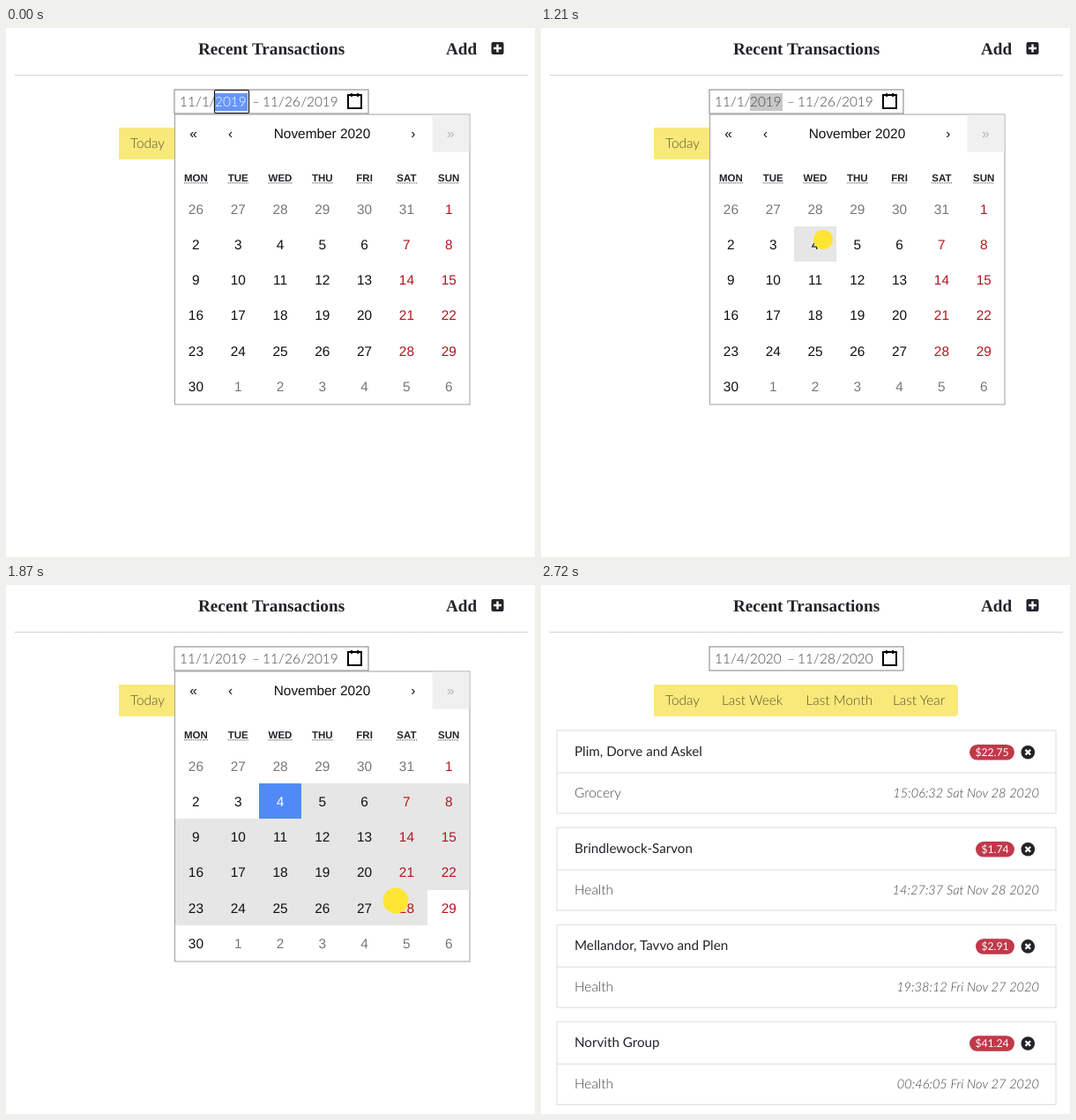
These frames come from a looping animation (600x600 px, 3820 ms). An HTML page:

```html
<!DOCTYPE html>
<html lang="en">
<head>
<meta charset="utf-8">
<title>Date range filter</title>
<style>
  html, body { margin: 0; width: 100%; height: 100%; overflow: hidden; background: #fff; }
  svg { display: block; width: 600px; height: 600px; text-rendering: geometricPrecision; }
  .head { font: bold 19.2px "Liberation Serif", Times, serif; fill: #212529; }
  .light { font: 300 15.4px Lato, sans-serif; fill: #444; }
  .name { font: 400 15.2px Lato, sans-serif; fill: #212529; }
  .stamp { font: italic 300 14.6px Lato, sans-serif; fill: #444; text-anchor: end; }
  .cost { font: 400 12.2px Lato, sans-serif; fill: #fff; text-anchor: middle; }
  .cal { font: 15.4px "Liberation Sans", Arial, sans-serif; text-anchor: middle; }
  .week { font: bold 11.5px "Liberation Sans", Arial, sans-serif; text-anchor: middle; fill: #212529; }
</style>
</head>
<body>
<svg id="stage" viewBox="0 0 600 600"></svg>
<script>
const LOOP = 3820;
const COL = 47.8, ROW = 40.3, LEFT = 191.5, TOP = 184.8;
const FIRST = 6; // grid index of November 1

const text = (cls, x, y, s, fill) =>
  `<text class="${cls}" x="${x}" y="${y}"${fill ? ` style="fill:${fill}"` : ''}>${s}</text>`;
const rect = (x, y, w, h, fill, more = '') =>
  `<rect x="${x}" y="${y}" width="${w}" height="${h}" fill="${fill}" ${more}/>`;
const path = (d, stroke, width = 1, more = '') =>
  `<path d="${d}" fill="none" stroke="${stroke}" stroke-width="${width}" ${more}/>`;
const disc = (x, y, r, fill) => `<circle cx="${x}" cy="${y}" r="${r}" fill="${fill}"/>`;

// Each step overrides parts of the one before it.
const steps = [
  { at: 0, open: true, focus: 'active' },
  { at: 160, focus: 'idle', back: true },
  { at: 750, back: false, hover: -2 },
  { at: 830, hover: 4 },
  { at: 1210, dot: [320, 240, 11] },
  { at: 1290, dot: [320, 240, 14.5] },
  { at: 1360, focus: '', dot: null, start: 4, end: 4 },
  { at: 1440, end: 12 },
  { at: 1520, end: 20 },
  { at: 1580, end: 28 },
  { at: 1870, dot: [442, 358, 14.5] },
  { at: 2020, dot: null },
  { at: 2100, open: false, picked: true },
  { at: 2720, list: true },
];

const transactions = [
  ['Plim, Dorve and Askel', '$22.75', 'Grocery', '15:06:32 Sat Nov 28 2020'],
  ['Brindlewock-Sarvon', '$1.74', 'Health', '14:27:37 Sat Nov 28 2020'],
  ['Mellandor, Tavvo and Plen', '$2.91', 'Health', '19:38:12 Fri Nov 27 2020'],
  ['Norvith Group', '$41.24', 'Health', '00:46:05 Fri Nov 27 2020'],
];

function header() {
  return text('head', 218, 30, 'Recent Transactions') + text('head', 499, 30, 'Add') +
    rect(550.5, 16, 14, 14, '#212529', 'rx="2"') +
    path('M553 23h9M557.5 18.5v9', '#fff', 2.4) +
    path('M10 53.5H592', '#c4c4c4', 1, 'stroke-dasharray="1.5 .5"');
}

function dateField({ focus, picked }) {
  const parts = picked
    ? [[197, '11'], [222, '4'], [237, '2020'], [291, '11'], [316, '28'], [341, '2020']]
    : [[197, '11'], [222, '1'], [237, '2019'], [291, '11'], [316, '26'], [341, '2019']];
  let out = rect(191, 70, 220, 27, '#fff', 'stroke="#808080"');
  if (focus === 'active') out += rect(236.5, 70.5, 39, 26, '#fff', 'stroke="#111" stroke-width="1.2" rx="1.5"');
  if (focus) out += rect(237, 74, 37, 20, focus === 'active' ? '#6696f8' : '#c8c8c8');
  parts.forEach(([x, s], i) =>
    out += text('light', x, 89, s, focus === 'active' && i === 2 ? '#fff' : ''));
  [215, 230.5, 309, 334.5].forEach(x => out += text('light', x, 89, '/'));
  return out + text('light', 279, 89, '–') +
    `<g transform="translate(386 74)">${path('M2 2H17V17H2ZM6 0V4M13 0V4', '#000', 2)}</g>`;
}

function shortcuts() {
  return rect(128, 113, 345, 36, '#f9e97b', 'rx="4"') + rect(128, 113, 8, 36, '#f9e97b') +
    [[141, 'Today'], [205, 'Last Week'], [300.5, 'Last Month'], [399, 'Last Year']]
      .map(([x, s]) => text('light', x, 136, s, '#5a542c')).join('');
}

function calendar({ back, hover, start, end }) {
  let out = rect(191.5, 98, 334.5, 329, '#fff', 'stroke="#a0a09a"') +
    rect(483.5, 98.5, 42, 42, '#f0f0f0');
  if (back) out += rect(233.8, 98.5, 42.2, 42, '#e6e6e6');
  [[212.5, '«'], [254.5, '‹'], [358.5, 'November 2020'], [461.7, '›'], [504.3, '»', '#b4b4b4']]
    .forEach(([x, s, fill]) => out += text('cal', x, 125, s, fill || '#111'));

  const lines = [27, 23, 27, 23, 18, 23, 24];
  'MON TUE WED THU FRI SAT SUN'.split(' ').forEach((s, i) => {
    const x = LEFT + COL * (i + .5);
    out += text('week', x, 174.3, s) +
      path(`M${x - lines[i] / 2} 175.8h${lines[i]}`, '#333', 1, 'stroke-dasharray="1 1"');
  });

  for (let i = 0; i < 42; i++) {
    const day = i - FIRST + 1, inside = day > 0 && day <= 30;
    const label = day < 1 ? day + 31 : inside ? day : day - 30;
    const x = LEFT + COL * (i % 7), y = TOP + ROW * Math.floor(i / 7);
    const picked = day === start;
    const shaded = start ? day > start && day <= end : day === hover;
    if (picked || shaded) out += rect(x, y, COL, ROW, picked ? '#4f8af7' : '#e6e6e6', 'shape-rendering="crispEdges"');
    const ink = picked ? '#fff' : !inside ? '#777' : i % 7 > 4 ? '#b3151f' : '#111';
    out += text('cal', x + COL / 2, y + 25.7, label, ink);
  }
  return out;
}

function card([name, cost, kind, stamp], i) {
  const y = 165 + i * 110.1, width = cost.length > 5 ? 51 : 44;
  return rect(18, y, 566, 94, '#fff', 'stroke="#dcdcdc"') +
    path(`M18 ${y + 48}H584`, '#dcdcdc') +
    text('name', 38, y + 29, name) +
    rect(537 - width, y + 16, width, 17.5, '#c0394b', 'rx="8.75"') +
    text('cost', 537 - width / 2, y + 29, cost) +
    disc(552.3, y + 24.7, 7.8, '#212529') +
    path(`M549.5 ${y + 21.9}l5.6 5.6m0 -5.6l-5.6 5.6`, '#fff', 2.2) +
    text('light', 38, y + 76, kind) + text('stamp', 565, y + 76, stamp);
}

function draw(state) {
  let out = header() + dateField(state) + shortcuts();
  if (state.open) out += calendar(state);
  if (state.list) out += transactions.map(card).join('');
  if (state.dot) out += disc(...state.dot, '#fee534');
  return out;
}

const stage = document.getElementById('stage');
const begin = performance.now();
let shown = -1;

function tick() {
  const t = (performance.now() - begin) % LOOP;
  const past = steps.filter(s => s.at <= t);
  if (past.length !== shown) {
    shown = past.length;
    stage.innerHTML = draw(Object.assign({}, ...past));
  }
  requestAnimationFrame(tick);
}
tick();
</script>
</body>
</html>
```
